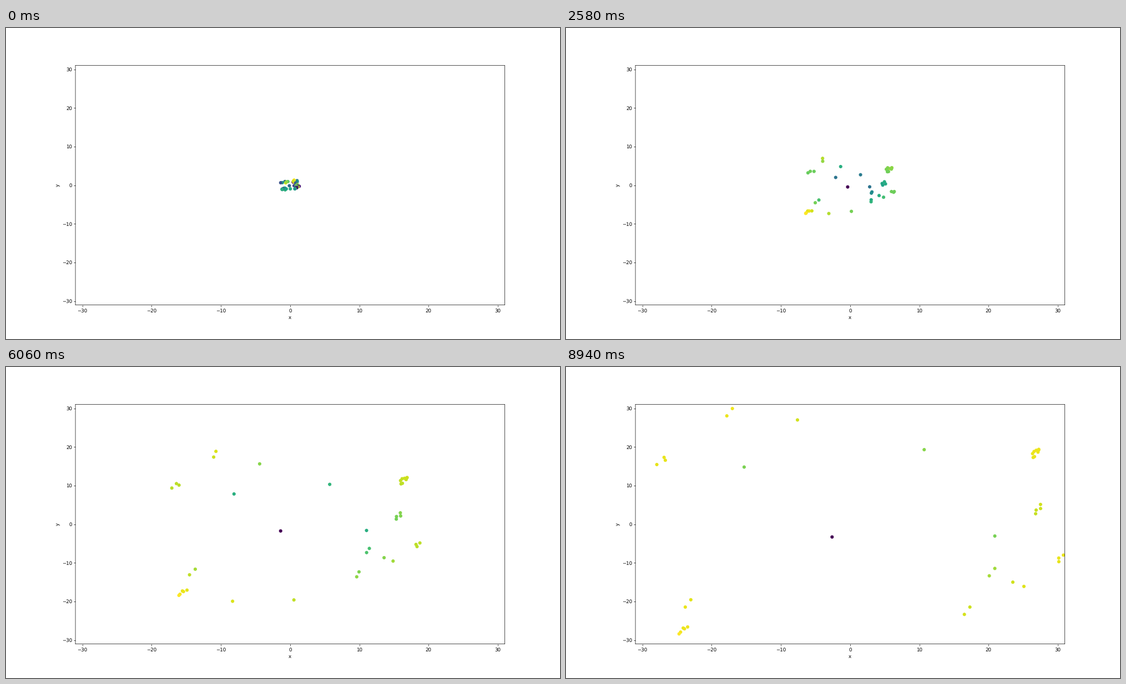
Recreate the animation shown at these times as a matplotlib script. Size 998x561 px, loop 9000 ms.

```python
import numpy as np
import matplotlib.pyplot as plt
from matplotlib.animation import FuncAnimation

W, H, DPI = 998, 561, 62.375
FRAMES, STEP = 150, 60
LIMIT = 31
DURATION = (FRAMES - 1) * STEP / 1000

# Where each group of particles ends up: x, y, members.
GROUPS = [
    (-17.4, 29, 2), (-7.6, 27, 1), (10.7, 19.3, 1), (-15.3, 14.8, 1),
    (-27.1, 16.4, 3), (-2.6, -3.3, 1), (27, 18.4, 8), (27, 4.2, 4),
    (30.5, -9, 3), (20.9, -3.05, 1), (20.5, -12.4, 2), (23.5, -15, 1),
    (25.1, -16.1, 1), (16.9, -22.4, 2), (-23.4, -20.5, 2),
    (-24.1, -27.3, 5), (-13.2, -31.7, 1), (0.9, -32.1, 1)]
STRETCH = np.array([0.8, 1.9])

rng = np.random.default_rng(4)


def spread(x, y, count):
    """Line up a group's members around its centre, a little scattered."""
    rank = np.linspace(0.5, -0.5, count) if count > 1 else np.zeros(1)
    ends = np.array([x, y]) + rank[:, None] * STRETCH
    noise = rng.normal(0, 0.25, (count, 2)) if count > 2 else 0 * ends
    return ends, noise


ends, noise = (np.concatenate(part)
               for part in zip(*(spread(*g) for g in GROUPS)))
starts = np.clip(ends / 24, -0.95, 0.95)
reach = np.hypot(ends[:, 0], ends[:, 1])
kick = rng.uniform(0, 4, len(ends))

# Particles that travel less far need longer to gather speed.
power = np.clip(1.17 + 0.034 * (35 - reach), 1.12, 1.65)


def state(frame):
    u = frame / (FRAMES - 1)
    pos = ends * (u ** power)[:, None] + starts * (1 - u) ** 6 + noise
    speed = power * reach / DURATION * u ** (power - 1)
    return pos, speed + kick * np.exp(-30 * u)


plt.rcParams["text.hinting"] = "none"
fig, ax = plt.subplots(figsize=(W / DPI, H / DPI + 1e-6), dpi=DPI)
dx, dy = 0.3 / W, 0.3 / H
fig.subplots_adjust(left=0.125 + dx, right=0.9 + dx,
                    bottom=0.11 - dy, top=0.88 - dy)
ax.set(xlim=(-LIMIT, LIMIT), ylim=(-LIMIT, LIMIT), xlabel="x", ylabel="y",
       xticks=range(-30, 31, 10), yticks=range(-30, 31, 10))
for line in [*ax.spines.values(), *ax.get_xticklines(), *ax.get_yticklines()]:
    line.set_snap(False)

first, tint = state(0)
dots = ax.scatter(first[:, 0], first[:, 1], c=tint, cmap="viridis")


def update(frame):
    pos, speed = state(frame)
    dots.set_offsets(pos)
    dots.set_array(speed)
    dots.set_clim(speed.min(), speed.max())
    return dots,


anim = FuncAnimation(fig, update, frames=FRAMES, interval=STEP,
                     repeat=True, repeat_delay=0)
plt.show()
```
